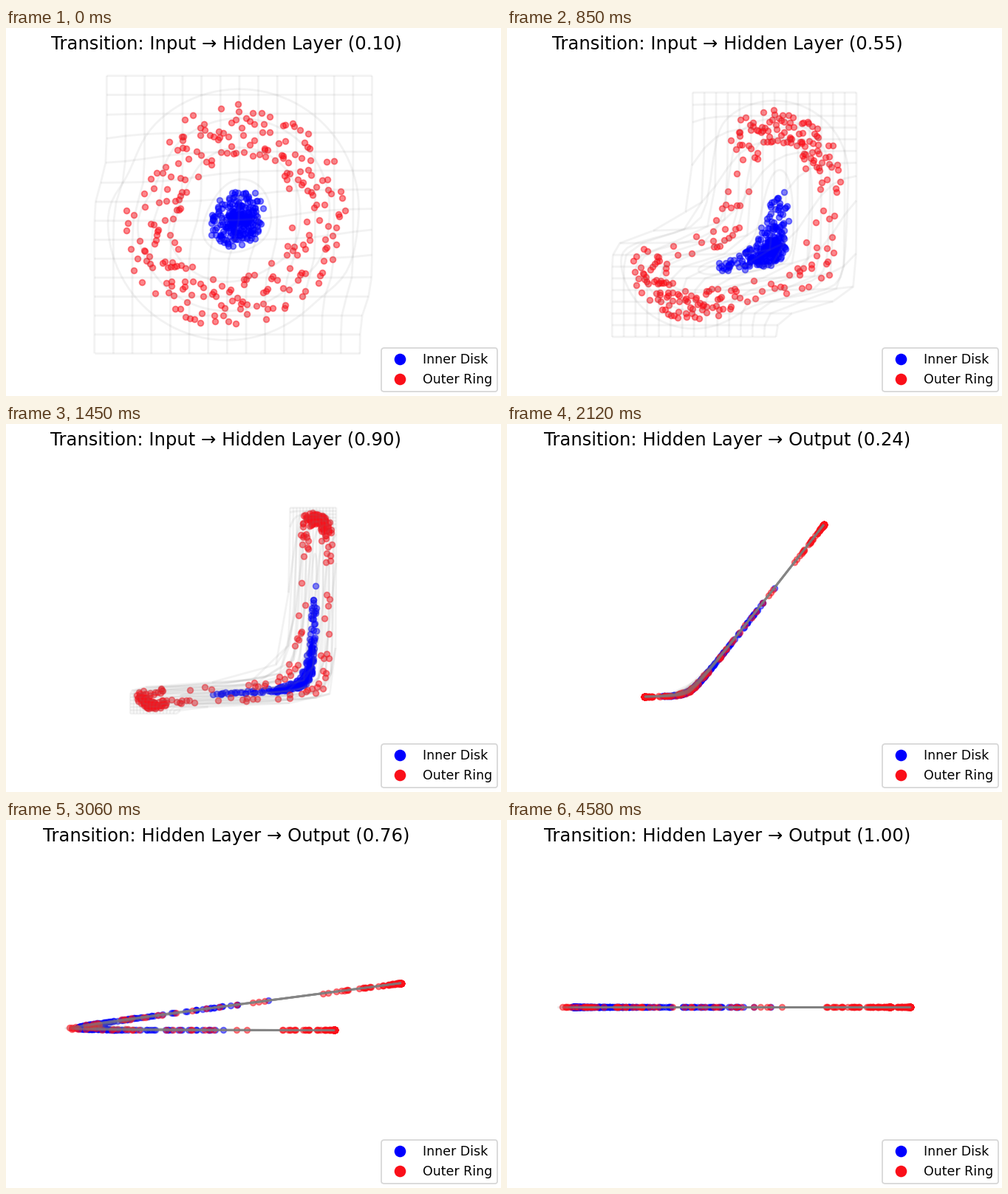
A matplotlib script for the animation above (4610 ms loop, 670 by 498 pixels).

```python
import numpy as np
import matplotlib.pyplot as plt
from matplotlib.animation import FuncAnimation
from matplotlib.collections import LineCollection
from matplotlib.lines import Line2D

W, H, DPI = 670, 498, 125
LOOP, FRAMES = 4610, 74
STEPS = 30            # blend steps per layer
FIRST = 3             # the loop opens a little into the first blend
CX, CY = 307.6, 252.6
BLUE, RED = "blue", "#fa0f19"

plt.rcParams["font.family"] = "DejaVu Sans"
rng = np.random.default_rng(7)


def hidden(p):
    """Two tanh units whose zero lines cross the plane almost in parallel."""
    x, y = p[..., 0], p[..., 1]
    h1 = np.tanh(3.2 * (y + 0.455 * x + 0.43))
    h2 = np.tanh(3.25 * (y + 0.40 * x - 0.41))
    return np.stack([h1, h2], axis=-1)


def output(h):
    """One linear unit, laid out along the x axis."""
    o = -2.32 * h[..., 0] + 2.45 * h[..., 1]
    return np.stack([o, np.zeros_like(o)], axis=-1)


def polar(r, t):
    return np.stack([r * np.cos(t), r * np.sin(t)], axis=-1)


def annulus(n, r0, r1):
    """Random radii, with the angles spread evenly in random order."""
    turn = (rng.permutation(n) + rng.random(n)) / n
    return polar(rng.uniform(r0, r1, n), 2 * np.pi * turn)


def make_ring(n):
    p = annulus(n, 1.0, 2.0)
    h1, h2 = hidden(p).T
    sparse = ((h2 > 0.25) & (h2 < 0.56)) | ((h1 > -0.64) & (h1 < -0.42))
    return p[~sparse]


def make_grid():
    axis = np.linspace(-2.5, 2.5, 15)
    gx, gy = np.meshgrid(axis, axis)
    rows = np.stack([gx, gy], axis=-1)
    lines = list(rows) + list(rows.transpose(1, 0, 2))
    turn = np.linspace(0, 2 * np.pi, 100)
    return lines + [polar(r, turn) for r in (0.6, 1.15, 1.7, 2.25)]


def layers(p):
    h = hidden(p)
    return p, h, output(h)


disk = layers(annulus(260, 0, 0.5))
ring = layers(make_ring(270))
grid = [layers(line) for line in make_grid()]

fig = plt.figure(figsize=(W / DPI, H / DPI), dpi=DPI, facecolor="white")
ax = fig.add_axes([0, 0, 1, 1])
ax.set_xlim(0, W)
ax.set_ylim(H, 0)
ax.axis("off")

dots = [ax.scatter([], [], s=20, color=c, alpha=0.5, zorder=1)
        for c in (BLUE, RED)]
mesh = LineCollection([], colors="gray", linewidths=1.6, alpha=0.1, zorder=2)
ax.add_collection(mesh, autolim=False)
title = ax.text(298, 28.7, "", fontsize=14, ha="center", va="baseline")

handles = [Line2D([], [], marker="o", color="w", markerfacecolor=c,
                  markersize=10, label=name)
           for c, name in ((BLUE, "Inner Disk"), (RED, "Outer Ring"))]
ax.legend(handles=handles, loc="lower right", fontsize=10, borderaxespad=0,
          bbox_to_anchor=(665, 492), bbox_transform=ax.transData)


def unit_size(stage, a):
    """Pixels per data unit; the view follows the extent of the data."""
    if stage == 0:
        return 284 / (3.7 - 1.5 * a)
    return 1 / max(0.0077 - 0.0049 * a, 0.0017 + 0.00774 * a)


def update(i):
    stage, step = divmod(min(i + FIRST, 2 * STEPS - 1), STEPS)
    a = step / (STEPS - 1)
    scale = unit_size(stage, a)

    def blend(p):
        return (1 - a) * p[stage] + a * p[stage + 1]

    lines = [blend(line) for line in grid]
    xs = np.concatenate([line[:, 0] for line in lines])
    mid = (xs.min() + xs.max()) / 2

    def to_px(p):
        return np.array([CX, CY]) + scale * (p - [mid, 0]) * [1, -1]

    mesh.set_segments([to_px(line) for line in lines])
    for dot, pts in zip(dots, (disk, ring)):
        dot.set_offsets(to_px(blend(pts)))
    name = ("Input → Hidden Layer", "Hidden Layer → Output")[stage]
    title.set_text(f"Transition: {name} ({a:.2f})")
    return [mesh, title, *dots]


anim = FuncAnimation(fig, update, frames=FRAMES, interval=LOOP / FRAMES,
                     repeat=True, repeat_delay=0, blit=False)
plt.show()
```
